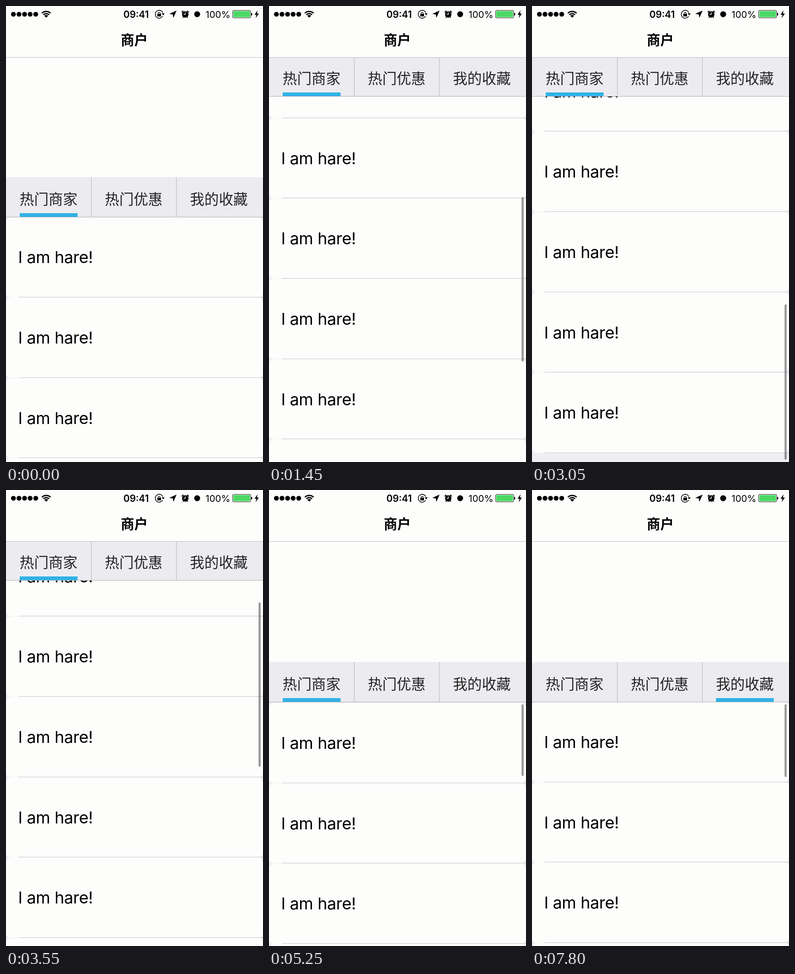
Recreate the animation shown at these times as an HTML page with a canvas. Size 562 by 997 pixels, loop 7850 ms.

```html
<!DOCTYPE html>
<html lang="zh">
<head>
<meta charset="utf-8">
<style>
html, body { margin: 0; width: 100%; height: 100%; overflow: hidden; background: #fdfdfc; }
canvas { display: block; }
</style>
</head>
<body>
<canvas id="stage" width="562" height="997"></canvas>
<script>
const W = 562, H = 997, LOOP = 7850, STEP = 50;
const PAPER = '#fdfdfc', GREY = '#ececf0', BLUE = '#2fb2e5', RULE = '#c9c8d0', INK = '#000';
const SCALE = W / 320;               // stage pixels per point
const CELL = 100 * SCALE, COUNT = 10, LIST = CELL * COUNT;
const TAB_W = 106 * SCALE, TAB_H = 50 * SCALE, TAB_FONT = 18 * SCALE;
const OPEN = 463.5, SHUT = 197.5, NAV = 112;
const CJK = '"Noto Sans CJK SC", "Noto Sans CJK", sans-serif';
const LATIN = 'Inter, Roboto, sans-serif';
const ctx = document.getElementById('stage').getContext('2d');

const clamp = (x, lo, hi) => Math.max(lo, Math.min(hi, x));
const span = (t, from, to) => clamp((t - from) / (to - from), 0, 1);
const glide = (t, from, to) => {
  const u = span(t, from, to);
  return u * u * (3 - 2 * u);
};

// Down past the end of the list, back to the top, then a small pull
function scrollAt(t) {
  const trip = glide(t, -55, 2600) - glide(t, 3100, 3800);
  const pull = Math.sin(Math.PI * span(t, 4500, 5500)) ** 2;
  return 1242.5 * trip - 4.4 * pull;
}

const tabAt = t => glide(t, 6000, 6250) + glide(t, 6850, 7100);

// The scroll thumb fades in on touch and out after rest
const thumbAt = t => span(t, 0, 50) - span(t, 4000, 4260)
  + span(t, 4500, 4550) - span(t, 5800, 6050) + span(t, 7100, 7150);

function rect(color, x, y, w, h) {
  ctx.fillStyle = color;
  ctx.fillRect(x, y, w, h);
}

function round(color, x, y, w, h, r) {
  ctx.fillStyle = color;
  ctx.beginPath();
  ctx.roundRect(x, y, w, h, r);
  ctx.fill();
}

function disc(x, y, r) {
  ctx.fillStyle = INK;
  ctx.beginPath();
  ctx.arc(x, y, r, 0, 7);
  ctx.fill();
}

function fill(path) {
  ctx.fillStyle = INK;
  ctx.fill(new Path2D(path));
}

function stroke(color, width, path) {
  ctx.strokeStyle = color;
  ctx.lineWidth = width;
  ctx.stroke(new Path2D(path));
}

function arc(width, x, y, r, from, to) {
  ctx.strokeStyle = INK;
  ctx.lineWidth = width;
  ctx.beginPath();
  ctx.arc(x, y, r, from, to);
  ctx.stroke();
}

function text(str, font, x, y, align = 'center', spacing = 0) {
  ctx.fillStyle = INK;
  ctx.font = font;
  ctx.textAlign = align;
  ctx.letterSpacing = spacing + 'px';
  ctx.fillText(str, x, y);
}

function drawClock(x, y) {
  disc(x, y, 7);
  for (const side of [-1, 1]) {
    stroke(INK, 2.4, `M${x + 7.6 * side} ${y - 4.5}l${-3.4 * side} -3.4`);
    stroke(INK, 1.6, `M${x + 4 * side} ${y + 5}l${1.7 * side} 2.4`);
  }
  stroke(PAPER, 1.4, `M${x - 3.5} ${y}h3.5v-4.5`);
}

function drawStatus() {
  for (let i = 0; i < 5; i++) disc(16.2 + i * 12.2, 18, 5.3);

  // Wi-Fi
  const up = -Math.PI / 2, half = .78;
  for (const [r, width] of [[13.6, 2.7], [8.8, 2.7], [3, 6]]) {
    arc(width, 88, 25.5, r, up - half, up + half);
  }

  text('09:41', '600 20.8px ' + LATIN, 284.5, 25.5);

  // Rotation lock
  arc(1.5, 335, 18, 8.6, .5, 5.9);
  arc(1.4, 335, 16.5, 2.4, Math.PI, 0);
  fill('M331 17h8v5.8h-8zM340.5 16h6.5l-3.3 4.5z');

  fill('M373 10l-7 16-1.3-7.6-7.7-1.2z');
  drawClock(392, 18.5);
  disc(418, 18, 6.5);
  text('100%', '400 20.5px ' + LATIN, 463.5, 25.5);

  // Battery
  round('#222', 495, 9, 40.5, 17.5, 3.5);
  round(PAPER, 496, 10, 38.5, 15.5, 2.5);
  round('#4cd964', 497, 11, 36.5, 13.5, 1.5);
  round(INK, 536, 15, 2.3, 6, [0, 2, 2, 0]);
  fill('M550 9.5l-6.5 9.5h4.2l-1.7 7.5 7-10h-4.2z');
}

function drawCells(scroll, top) {
  ctx.save();
  ctx.beginPath();
  ctx.rect(0, top, W, H - top);
  ctx.clip();
  rect('#efeff3', 0, top, W, H - top);
  for (let i = 0; i < COUNT; i++) {
    const y = OPEN - scroll + i * CELL;
    round(PAPER, 0, y, W, CELL - .6, 11);
    rect(RULE, 28, Math.round(y + CELL - 1.5), W - 28, 1);
    text('I am hare!', '400 36px ' + LATIN, 26.5, Math.round(y + 100.5), 'left', -.4);
  }
  ctx.restore();
}

function drawTabs(edge, active) {
  const bottom = Math.round(edge), top = bottom - TAB_H;
  rect(GREY, 0, top, W, TAB_H);
  ['热门商家', '热门优惠', '我的收藏'].forEach((label, i) => {
    ctx.globalAlpha = .85;           // softens the strokes towards a light weight
    text(label, `300 ${TAB_FONT}px ${CJK}`, (i + .5) * TAB_W, bottom - 28);
    ctx.globalAlpha = 1;
    if (i) rect('#b4b4b8', Math.round(i * TAB_W), top, 1, TAB_H);
  });
  rect('#acacb0', 0, bottom - 1, W, 1);
  rect(BLUE, 30 + active * TAB_W, bottom - 9, 4 * TAB_FONT, 8);
}

function drawThumb(scroll, top, alpha) {
  const height = H - top, track = height - 10;
  const offset = scroll - (OPEN - top), range = LIST - height;
  const over = Math.max(0, -offset, offset - range);
  const length = track * height / LIST - over;
  const y = top + 5 + (track - length) * clamp(offset / range, 0, 1);
  round(`rgba(0,0,0,${.4 * alpha})`, 552.3, y, 4.6, length, 2.3);
}

function draw(t) {
  const scroll = scrollAt(t);
  const top = clamp(OPEN - scroll, SHUT, OPEN);
  rect(PAPER, 0, 0, W, H);
  drawCells(scroll, top);
  drawThumb(scroll, top, thumbAt(t));
  drawTabs(top, tabAt(t));
  rect(PAPER, 0, 0, W, NAV);
  rect('#bdbccb', 0, NAV, W, 1);
  drawStatus();
  text('商户', '700 29.5px ' + CJK, 280.5, 85);
}

function tick(now) {
  draw(Math.floor(now % LOOP / STEP) * STEP);
  requestAnimationFrame(tick);
}
requestAnimationFrame(tick);
</script>
</body>
</html>
```
